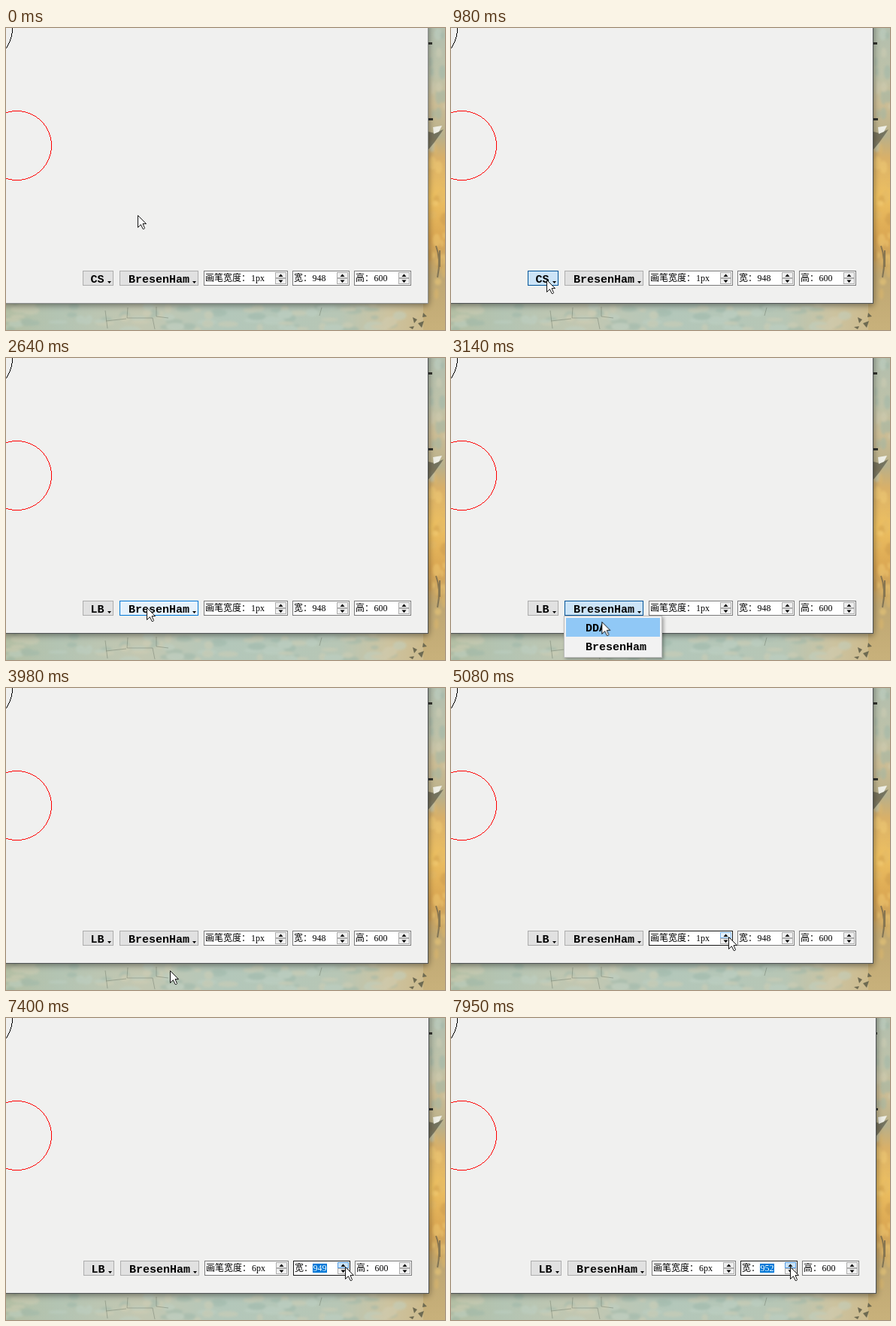
Write an HTML page that moves like this. It is 584 px wide and 402 px high and loops after 8000 ms.

```html
<!DOCTYPE html>
<html lang="zh-CN">
<head>
<meta charset="utf-8">
<title>Drawing window</title>
<style>
html, body { margin: 0; width: 100%; height: 100%; overflow: hidden; }
svg { display: block; width: 584px; height: 402px; }
text { font: 500 12px "Liberation Serif", "Noto Sans CJK SC", "Noto Sans CJK", serif; white-space: pre; }
.bold { font: bold 15px "Liberation Mono", monospace; }
.btn { fill: #e1e1e1; stroke: #adadad; }
.box { fill: #fff; stroke: #7a7a7a; }
.step { fill: #f0f0f0; stroke: #adadad; }
.sel { fill: #0078d7; }
.panel { fill: #f2f2f2; stroke: #bdbdbd; filter: drop-shadow(2px 2px 2px #0005); }
.hl { fill: #90c8f6; opacity: 0; }
.menu { opacity: 0; }
.frame { fill: #f0f0ef; stroke: #8b8e8d; filter: drop-shadow(0 2px 4px #0007); }

#cursor { animation: move 8s ease-in-out infinite; }
.frame, .btn, .box, .step, .hl { animation: 8s step-end infinite; }
.frame { animation-name: frame; }
#clip .btn { animation-name: clip; }
#line .btn { animation-name: line; }
#pen .box { animation-name: pen; }
#pen .up { animation-name: penUp; }
#wide .box { animation-name: wide; }
#wide .up { animation-name: wideUp; }
#clipMenu { animation: clipMenu 8s linear infinite; }
#lineMenu { animation: lineMenu 8s linear infinite; }
#clipMenu .a { animation-name: clipA; }
#clipMenu .b { animation-name: clipB; }
#lineMenu .a { animation-name: lineA; }
#lineMenu .b { animation-name: lineB; }

@keyframes move {
  0%, 2% { transform: translate(175px, 249px); animation-timing-function: ease-in; }
  4.5% { transform: translate(186px, 268px); animation-timing-function: ease-out; }
  11%, 18.5% { transform: translate(127px, 335px); }
  23.1%, 26% { transform: translate(131px, 377px); }
  32%, 35.25% { transform: translate(187px, 332px); }
  44%, 51% { transform: translate(218px, 376px); }
  59.75% { transform: translate(375px, 338px); }
  63.4%, 76% { transform: translate(369px, 331px); animation-timing-function: ease-in; }
  79.5% { transform: translate(420px, 344px); animation-timing-function: ease-out; }
  82%, 83.25% { transform: translate(459px, 337px); }
  85.1%, 100% { transform: translate(451px, 331px); }
}
@keyframes frame { 12.25%, 100% { stroke: #505455; } }
@keyframes clip {
  9.3% { fill: #e5f1fb; stroke: #0078d7; }
  12.25% { fill: #cce4f7; stroke: #005499; }
  25.12%, 100% { fill: #e1e1e1; stroke: #adadad; }
}
@keyframes line {
  30.5% { fill: #e5f1fb; stroke: #0078d7; }
  33.37% { fill: #cce4f7; stroke: #005499; }
  49.75%, 100% { fill: #e1e1e1; stroke: #adadad; }
}
@keyframes pen {
  58.5% { stroke: #171717; }
  77.2% { stroke: #0078d7; }
  86.37%, 100% { stroke: #7a7a7a; }
}
@keyframes penUp {
  61% { fill: #e5f1fb; stroke: #7eb4ea; }
  64.5% { fill: #cce4f7; stroke: #569de5; }
  73.6% { fill: #e5f1fb; stroke: #7eb4ea; }
  77%, 100% { fill: #f0f0f0; stroke: #adadad; }
}
@keyframes wide { 78.2%, 100% { stroke: #171717; } }
@keyframes wideUp {
  81% { fill: #e5f1fb; stroke: #7eb4ea; }
  86.37%, 100% { fill: #cce4f7; stroke: #569de5; }
}
@keyframes clipMenu { 0%, 12.6% { opacity: 0; } 14.4%, 25.12% { opacity: 1; } 25.13%, 100% { opacity: 0; } }
@keyframes lineMenu { 0%, 33.37% { opacity: 0; } 34.9%, 49.74% { opacity: 1; } 49.75%, 100% { opacity: 0; } }
@keyframes clipA { 20% { opacity: 1; } 22%, 100% { opacity: 0; } }
@keyframes clipB { 22%, 100% { opacity: 1; } }
@keyframes lineA { 38.5% { opacity: 1; } 41.9%, 100% { opacity: 0; } }
@keyframes lineB { 41.9%, 100% { opacity: 1; } }
</style>
</head>
<body>
<svg viewBox="0 0 584 402">
  <defs>
    <linearGradient id="floor">
      <stop offset="0" stop-color="#b4bfa4"/>
      <stop offset=".12" stop-color="#b3c4b3"/>
      <stop offset=".3" stop-color="#c3c7b1"/>
      <stop offset=".5" stop-color="#b3c7ba"/>
      <stop offset=".76" stop-color="#b7c6b5"/>
      <stop offset=".87" stop-color="#ccc3a0"/>
      <stop offset="1" stop-color="#ccb582"/>
    </linearGradient>
    <linearGradient id="side" x2="0" y2="1">
      <stop offset="0" stop-color="#b3bfae"/>
      <stop offset=".16" stop-color="#bec2a9"/>
      <stop offset=".25" stop-color="#ccbd95"/>
      <stop offset=".36" stop-color="#b9b08a"/>
      <stop offset=".43" stop-color="#d9b068"/>
      <stop offset=".56" stop-color="#edc061"/>
      <stop offset=".7" stop-color="#d9a552"/>
      <stop offset=".82" stop-color="#bfa772"/>
      <stop offset="1" stop-color="#c8b17b"/>
    </linearGradient>
    <filter id="soft" x="-5%" y="-5%" width="110%" height="110%"><feGaussianBlur stdDeviation="1.800"/></filter>
    <path id="drop" d="M0 0h5l-2.500 3z"/>
    <path id="arrows" d="M-3 8l3-3.500 3 3.500zM-3 12.500l3 3.500 3-3.500z"/>
  </defs>

  <g id="wall">
    <path fill="url(#floor)" d="M0 360h584v42H0z"/>
    <path fill="url(#side)" d="M555 0h29v402h-29z"/>
    <g id="blots" filter="url(#soft)" opacity=".45"></g>
    <g fill="none" stroke="#6c7566" opacity=".45">
      <path d="M132 376l3 24M162 372l-1 14h34l3 15M200 371v13l16 2M133 390l27-3M420 372l-3 11"/>
    </g>
    <path d="M562 138l8 2 12-5-12 17-9 11z" fill="#5c5a49" opacity=".7"/>
    <path d="M572 290q7 18 2 42M577 296v22" fill="none" stroke="#66604a" stroke-width="2" opacity=".7"/>
    <path d="M568 132l12-2-4 8-7 3z" fill="#eeeee5"/>
    <path d="M541 385l6 3-4 5zM548 393l8-3-3 9zM536 398l7-1-2 4zM555 379l5 5-6 1z" fill="#6d6a52"/>
    <path d="M562 19h5v3h-5zM562 120h6v3h-6z" fill="#34362f"/>
  </g>

  <g class="shift"><rect class="frame" x="-30" y="-30" width="591.500" height="396.500"/></g>
  <g shape-rendering="crispEdges">
    <path id="blackRing"/>
    <path id="redRing" fill="#f00"/>
  </g>

  <g class="shift">
    <g id="clip">
      <rect class="btn" x="102.500" y="323.500" width="40" height="19"/>
      <text class="bold" id="clipName" x="112.500" y="339">CS</text>
      <use href="#drop" x="135" y="337"/>
    </g>
    <g id="line">
      <rect class="btn" x="151.500" y="323.500" width="104" height="19"/>
      <text class="bold" x="163" y="339">BresenHam</text>
      <use href="#drop" x="248" y="337"/>
    </g>
    <g id="pen" transform="translate(263 323)">
      <rect class="box" x=".5" y=".5" width="111" height="19"/>
      <rect class="step up" x="95.500" y="2.500" width="14" height="7"/>
      <rect class="step" x="95.500" y="10.500" width="14" height="7"/>
      <use href="#arrows" x="102.500"/>
      <text x="2" y="14">画笔宽度：</text>
      <rect class="sel" x="63" y="4" width="6" height="12"/>
      <text x="63" y="14"><tspan class="num">1</tspan>px</text>
    </g>
    <g id="wide" transform="translate(381 323)">
      <rect class="box" x=".5" y=".5" width="75" height="19"/>
      <rect class="step up" x="59.500" y="2.500" width="14" height="7"/>
      <rect class="step" x="59.500" y="10.500" width="14" height="7"/>
      <use href="#arrows" x="66.500"/>
      <text x="2" y="14">宽：</text>
      <rect class="sel" x="26" y="4" width="19" height="12"/>
      <text x="26.500" y="14"><tspan class="num">948</tspan></text>
    </g>
    <g transform="translate(463 323)">
      <rect class="box" x=".5" y=".5" width="75" height="19"/>
      <rect class="step" x="59.500" y="2.500" width="14" height="7"/>
      <rect class="step" x="59.500" y="10.500" width="14" height="7"/>
      <use href="#arrows" x="66.500"/>
      <text x="2" y="14">高：</text>
      <text x="26.500" y="14">600</text>
    </g>
  </g>

  <g id="clipMenu" class="menu">
    <rect class="panel" x="101.500" y="343.500" width="73" height="55"/>
    <rect class="hl a" x="104" y="346" width="68" height="25"/>
    <rect class="hl b" x="104" y="371" width="68" height="25"/>
    <text class="bold" x="130" y="364">CS</text>
    <text class="bold" x="130" y="389">LB</text>
  </g>
  <g id="lineMenu" class="menu">
    <rect class="panel" x="150.500" y="343.500" width="130" height="55"/>
    <rect class="hl a" x="153" y="346" width="125" height="25"/>
    <rect class="hl b" x="153" y="371" width="125" height="25"/>
    <text class="bold" x="179" y="364">DDA</text>
    <text class="bold" x="179" y="389">BresenHam</text>
  </g>

  <path id="cursor" d="M.5.500V16.500L4.400 12.700 7.200 18.500H8.700L9.500 17.400 7 11.600H11.500Z" fill="#fff" stroke="#111"/>
</svg>
<script>
const LOOP = 8000;
const $ = s => document.querySelector(s);

// One-pixel circle, eight-way symmetric.
function ring(cx, cy, r) {
  let d = '';
  const dot = (x, y) => d += `M${cx + x} ${cy + y}h1v1h-1z`;
  for (let a = 0, b = r; a <= b; a++, b = Math.round(Math.sqrt(r * r - a * a))) {
    for (const [x, y] of [[a, b], [b, a]]) {
      dot(x, y); dot(-x, y); dot(x, -y); dot(-x, -y);
    }
  }
  return d;
}

// Seeded mottling of the painted wall.
function mottle() {
  let seed = 7;
  const rnd = () => (seed = seed * 16807 % 2147483647) / 2147483647;
  const spot = (x, y, rx, ry, fill) =>
    `<ellipse cx="${x}" cy="${y}" rx="${rx}" ry="${ry}" fill="${fill}"/>`;
  const pick = list => list[Math.floor(rnd() * list.length)];
  const cool = ['#d2cfb5', '#9ab5a8', '#bfd2c6'];
  const warm = ['#f3cf78', '#c9984c', '#e0b868'];
  let out = '';
  for (let i = 0; i < 90; i++) {
    out += spot(rnd() * 530, 368 + rnd() * 34, 4 + rnd() * 10, 2 + rnd() * 4, pick(cool));
  }
  for (let i = 0; i < 40; i++) {
    const y = rnd() * 360;
    out += spot(562 + rnd() * 22, y, 2 + rnd() * 4, 3 + rnd() * 8, pick(y < 160 ? cool : warm));
  }
  return out;
}

// Count how many of the given moments have passed.
const passed = (t, times) => times.filter(at => t >= at).length;

const penSteps = [5160, 5650, 5730, 5800, 5880];
const wideSteps = [6910, 7430, 7690, 7950];
const shiftSteps = [7270, 7430, 7690, 7950];
const wideFocus = wideSteps[0];

function setSpin(id, value, selected) {
  const num = $(id + ' .num');
  num.textContent = value;
  num.setAttribute('fill', selected ? '#fff' : '#000');
  $(id + ' .sel').setAttribute('visibility', selected ? 'visible' : 'hidden');
}

function draw(t) {
  $('#clipName').textContent = t < 2010 ? 'CS' : 'LB';
  setSpin('#pen', 1 + passed(t, penSteps), t >= penSteps[0] && t < wideFocus);
  setSpin('#wide', 948 + passed(t, wideSteps), t >= wideFocus);
  const dx = passed(t, shiftSteps);
  for (const g of document.querySelectorAll('.shift')) {
    g.setAttribute('transform', `translate(${dx} 0)`);
  }
}

let start;
function tick(now) {
  start ??= now;
  draw((now - start) % LOOP);
  requestAnimationFrame(tick);
}

$('#blots').innerHTML = mottle();
$('#blackRing').setAttribute('d', ring(-38, 0, 46));
$('#redRing').setAttribute('d', ring(14, 156, 46));
draw(0);
requestAnimationFrame(tick);
</script>
</body>
</html>
```
